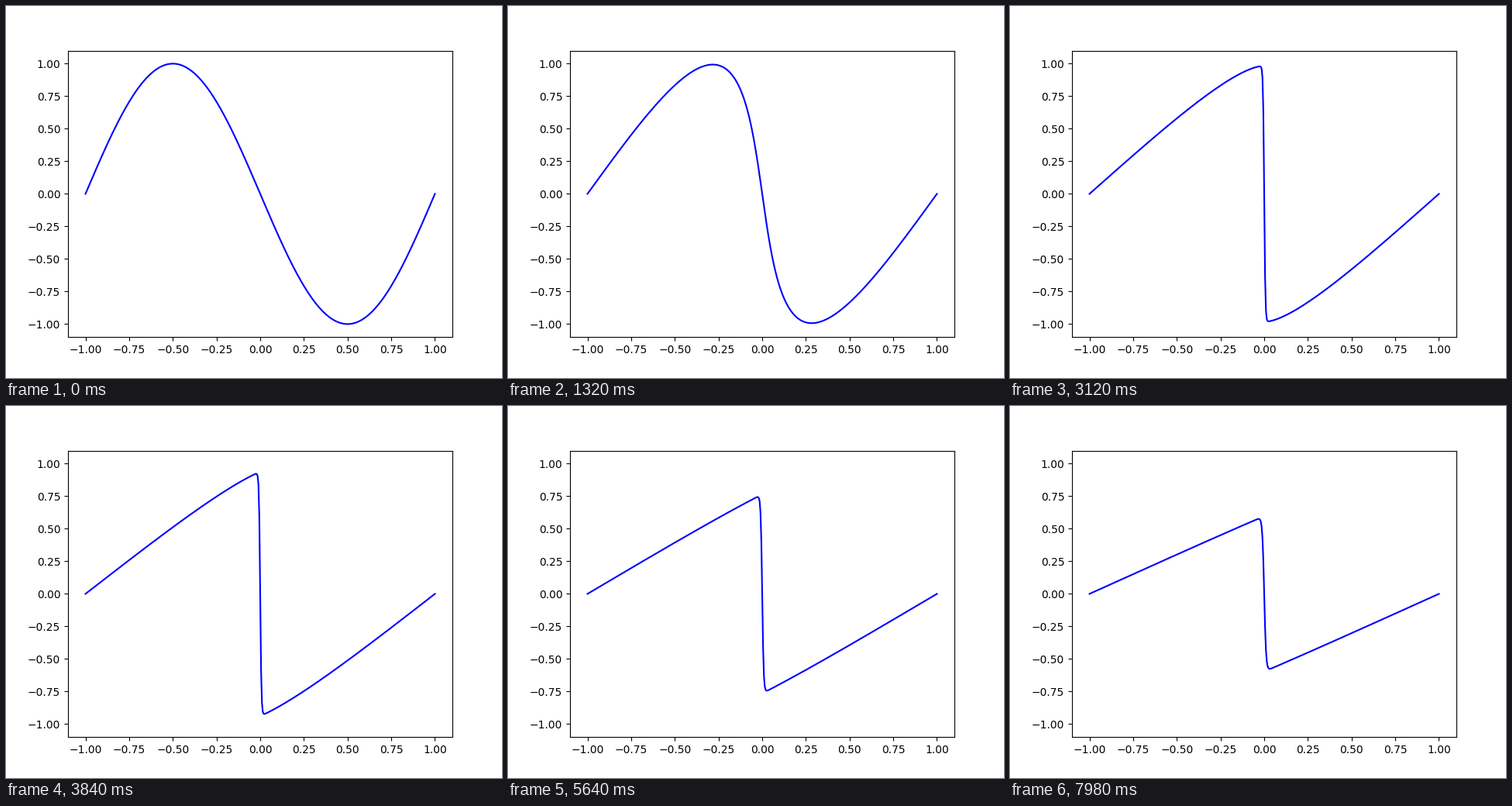
These frames come from a looping animation (640x480 px, 8000 ms). A matplotlib script:

```python
import numpy as np
import matplotlib.pyplot as plt
from matplotlib.animation import FuncAnimation

# Viscous Burgers equation, u(x, 0) = -sin(pi x), solved by the Cole-Hopf formula
NU = 0.01 / np.pi
DT = 0.01
STEPS = 134
HOLD = 3        # 20 ms ticks per time step
TICKS = 400

x = np.linspace(-1, 1, 401)
q = np.linspace(-10, 10, 401)


def burgers(t):
    y = np.pi * (x[:, None] - np.sqrt(4 * NU * t) * q)
    weight = np.exp(-np.cos(y) / (2 * np.pi * NU) - q**2)
    return -(np.sin(y) * weight).sum(axis=1) / weight.sum(axis=1)


waves = [burgers(k * DT) for k in range(STEPS)]

fig, ax = plt.subplots(figsize=(6.4, 4.8), dpi=100)
line, = ax.plot(x, waves[0], color="blue", lw=1.5)
ax.set_xlim(-1.1, 1.1)
ax.set_ylim(-1.1, 1.1)


def update(tick):
    line.set_ydata(waves[tick // HOLD])
    return line,


anim = FuncAnimation(fig, update, frames=TICKS, interval=20,
                     repeat=True, repeat_delay=0, blit=True)
plt.show()
```
